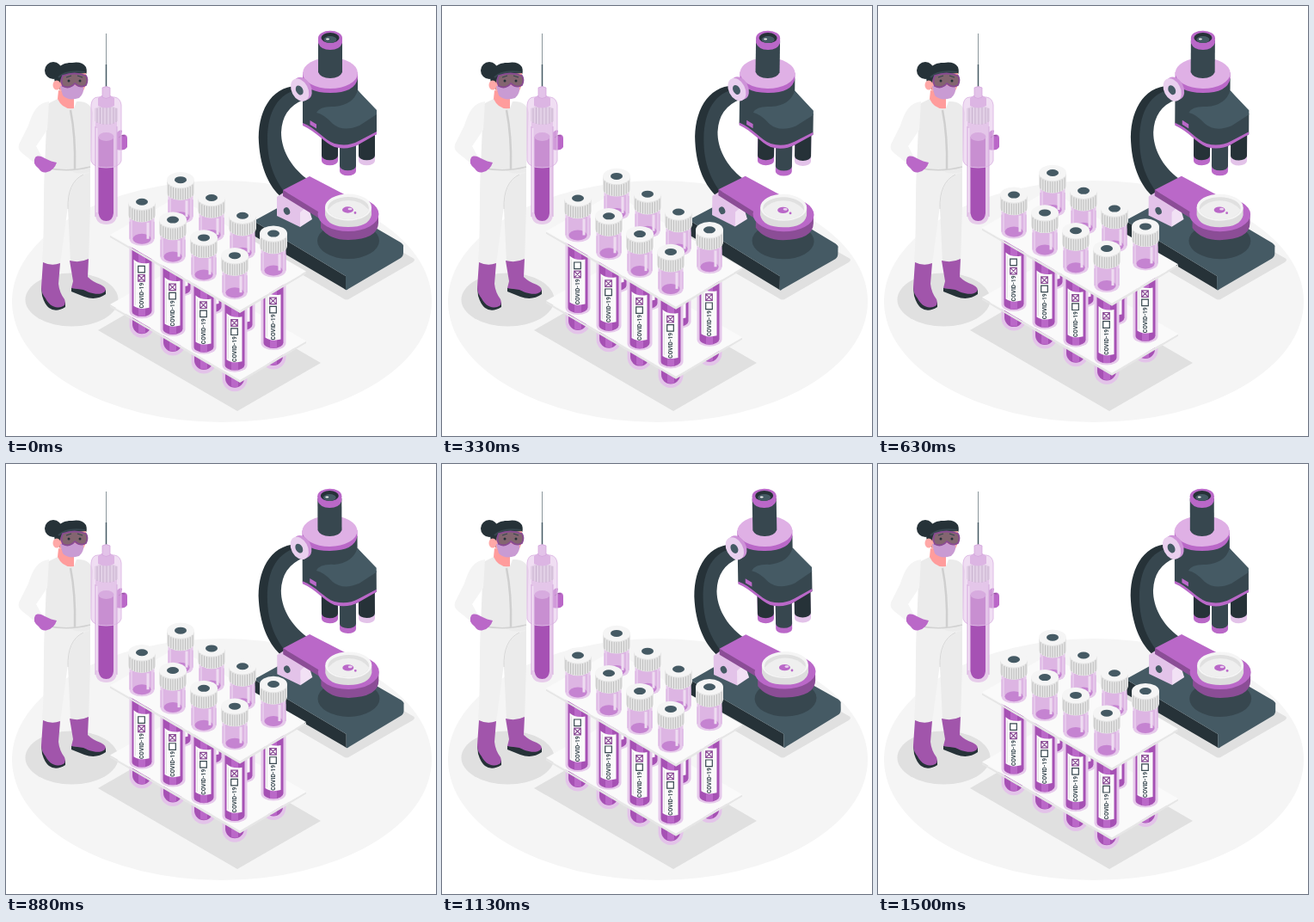
Animation of 500x500 px, one loop 1.54 s. Source, as an HTML page:

```html
<!DOCTYPE html>
<html lang="en">
<head>
<meta charset="utf-8">
<title>Laboratory test</title>
<style>
  html, body { margin: 0; width: 100%; height: 100%; overflow: hidden; background: #fff; }
  svg { display: block; width: 100vw; height: 100vh; }
  text { font: 700 6.7px Roboto, sans-serif; fill: #37474f; }
</style>
</head>
<body>
<svg viewBox="0 0 500 500">
  <ellipse cx="251" cy="343.500" rx="244" ry="140.500" fill="#f5f5f5"/>
  <g fill="#e0e0e0">
    <ellipse cx="76.500" cy="341.500" rx="54" ry="31"/>
    <path d="M275 272 392 340Q396 343 400 340L473 298Q477 295 473 293L355 226Z"/>
    <path d="M107 377 269 471 366 415 204 321Z"/>
  </g>

  <g id="person">
    <path d="M69 191 98 188 98 232 96 298Q85 302 75 298L72 235Z" fill="#ebebeb"/>
    <path d="M45 188 76 192Q84 197 98 193Q76 200 73 225L63 300Q52 304 42 299C45 260 43 220 45 188Z" fill="#f0f0f0"/>
    <path d="M72 236Q71 205 90 196" fill="none" stroke="#d8d8d8"/>
    <path d="M41 327 42 337Q45 347 50 351Q58 357 69 350V345ZM76 328 76 332 91 338Q105 343 116 335V330Z" fill="#263238"/>
    <path d="M43 298Q53 303 63 299L61 323Q62 333 68 341Q71 348 64 350C55 352 49 346 46 340Q41 334 41 327Z" fill="#a155ab"/>
    <path d="M74 296Q86 299 96 294L95 315Q101 321 110 324Q118 328 115 332C108 338 96 333 90 330L76 328 78 320Z" fill="#a155ab"/>
    <path d="M48 114 62 107Q67 121 79 119L82 111Q98 110 101 124L98 188Q73 195 45 188Z" fill="#ebebeb"/>
    <path d="M75 121Q81 151 80 190" fill="none" stroke="#cfcfcf" stroke-width="2.500"/>
    <path d="M46 188Q72 194 98 187" fill="none" stroke="#d2d2d2" stroke-width="1.500"/>
    <path d="M50 111C37 113 32 121 26 139L15 161Q13 167 20 172L35 184 42 176 35 163 48 144Z" fill="#f4f4f4"/>
    <path d="M34 176C40 171 48 181 59 182Q56 191 48 193Q42 195 38 189Q30 183 34 176Z" fill="#ba68c8"/>
    <path d="M61 98 60 108Q66 121 79 119V103Z" fill="#ff9c9c"/>
    <circle cx="55" cy="75" r="10" fill="#263238"/>
    <path d="M58 92C51 73 66 65 77 66Q88 64 93 71Q95 77 92 82L65 100Z" fill="#263238"/>
    <path d="M64 84Q77 79 93 78L92 94Q88 106 74 107L62 98Z" fill="#ffa8a7"/>
    <ellipse cx="59" cy="92" rx="4.500" ry="5.500" fill="#ffa8a7"/>
    <path d="M61 83Q70 74 92 77" fill="none" stroke="#37474f" stroke-width="2"/>
    <path d="M63 93Q72 92 78 91Q84 95 90 94Q91 102 85 107Q73 111 66 104Z" fill="#c99bd3"/>
    <path d="M66 81Q80 76 93 81Q96 86 93 92Q87 96 80 90Q74 97 66 93Q63 87 66 81Z" fill="#836570" stroke="#894a93" stroke-width="1.800"/>
    <g fill="#263238"><circle cx="73" cy="87" r="1.500"/><circle cx="86" cy="87" r="1.500"/></g>
    <path d="M70 83 76 81M83 81 89 83" stroke="#37474f" stroke-width="1.300"/>
    <path d="M129 147Q133 143 135 145L134 150Q141 148 141 154V164Q138 169 129 167Z" fill="#ba68c8"/>
    <path d="M131 153Q135 149 138 151" fill="none" stroke="#8d4f97"/>
  </g>

  <g id="syringe">
    <path d="M116.500 32V94" stroke="#8b979c"/>
    <path d="M116.500 68V95" stroke="#455a64" stroke-width="1.500"/>
    <path d="M104 130V243Q105 254 116.500 254T129 243V130Z" fill="#e6cbea"/>
    <path d="M107.500 152V241Q109 250 116.500 250T125 241V152Z" fill="#a651b4"/>
    <ellipse cx="116.500" cy="152" rx="9" ry="5" fill="#c98fd3"/>
    <path d="M99 115Q100 106 107 106H126Q133 107 134 115V180Q132 188 116.500 188T99 180Z" fill="#e3c3e9" fill-opacity=".55" stroke="#dfbce6"/>
    <path d="M103 119Q116 112 130 119V134Q117 141 103 134Z" fill="#e2d0e6"/>
    <path d="M106 119V136M109.500 118V137M113 118V138M117 118V138M121 118V138M125 118V137M128 119V135" stroke="#c9b2cf"/>
    <path d="M107 107Q116 99 126 107V116Q116 121 107 116Z" fill="#dcb5e3"/>
    <path d="M112 95Q116.500 92 121 95V106Q116 109 112 106Z" fill="#e3c3e9" stroke="#d1a0da" stroke-width=".7"/>
    <path d="M104 140V245M129 140V245" stroke="#d5a9dd"/>
    <path d="M105.500 142V240" stroke="#f3e1f5" stroke-width="1.500"/>
  </g>

  <g id="scope">
    <path d="M288 250 395 314V330L392 328 288 267Z" fill="#263238"/>
    <path d="M288 250 395 314V330Q396 331 398 329L459 293Q462 291 462 287V280Q463 278 459 275L354 214Z" fill="#455a64"/>
    <ellipse cx="398" cy="273" rx="36" ry="21" fill="#37474f"/>
    <path d="M338 93C307 94 292 125 294 159C296 190 307 211 320 222L325 214C300 185 295 120 341 102Z" fill="#263238"/>
    <path d="M341 97C317 101 304 122 304 155C304 186 315 205 325 218L350 201C330 186 320 166 320 147Q321 119 346 109Z" fill="#37474f"/>
    <path d="M315 222 324 216 353 234 342 257 315 244Z" fill="#e3c3e9"/>
    <path d="M342 257 356 248 351 232 342 240Z" fill="#f2e1f5"/>
    <ellipse cx="326.500" cy="238.500" rx="3.500" ry="4.500" transform="rotate(-25 326.5 238.500)" fill="#455a64"/>
    <path d="M322 214V221L366 248V258Q376 272 398 272Q433 271 433 252V242L366 238Z" fill="#8b4d96"/>
    <path d="M322 214 353 198 401 223 366 241Z" fill="#ba68c8"/>
    <ellipse cx="398" cy="242" rx="35.500" ry="20" fill="#ba68c8"/>
    <path d="M371 234V243Q374 257 398 257T425 243V234Z" fill="#ddd"/>
    <ellipse cx="398" cy="234" rx="27" ry="15.500" fill="#f5f5f5"/>
    <ellipse cx="398" cy="235" rx="24" ry="13" fill="#e0e0e0"/>
    <path d="M374 237Q383 226 398 226T422 237Q416 248 398 248T374 237Z" fill="#efefef"/>
    <g fill="#ba68c8">
      <ellipse cx="397.500" cy="237" rx="6.500" ry="3.700"/><circle cx="406" cy="240.500" r="1.400"/>
      <ellipse cx="400" cy="236" rx="2.500" ry="1.300" fill="#ead2ef"/>
    </g>

    <g id="lenses"></g>

    <path d="M345 113V137C360 143 370 158 382 163Q397 168 410 161L431 149V125L409 98V84H346Z" fill="#37474f"/>
    <path d="M361 124Q365 116 382 117Q404 115 409 98L431 121V126L411 139Q392 147 380 137Q370 126 361 124Z" fill="#455a64"/>
    <path d="M345 136C361 142 370 156 382 160Q397 164 410 157L431 146V149L410 161Q397 168 382 164C370 159 361 146 345 139Z" fill="#ba68c8"/>
    <path d="M353.500 133 361 137.500V142.500L353.500 138Z" fill="#ba68c8"/>
    <path d="M345 77V84Q348 101 377 101T409 84V77Z" fill="#ba68c8"/>
    <ellipse cx="377" cy="78" rx="32" ry="18" fill="#dfb0e5"/>
    <path d="M363 40V77Q366 84 377 84T391 77V40Z" fill="#37474f"/>
    <path d="M363 37V43Q366 51 377 51T391 43V37Z" fill="#ba68c8"/>
    <ellipse cx="377" cy="37" rx="14" ry="8.300" fill="#ba68c8"/>
    <ellipse cx="377" cy="37" rx="10.500" ry="6" fill="#263238"/>
    <ellipse cx="377" cy="39" rx="7.500" ry="4" fill="#455a64"/>
    <ellipse cx="374" cy="38.500" rx="2" ry="1" fill="#eee"/>
    <g transform="rotate(-28 343 97)">
      <ellipse cx="345" cy="97" rx="10" ry="14" fill="#ce93d8"/>
      <ellipse cx="341.500" cy="97" rx="9.500" ry="14" fill="#e9cfee"/>
      <ellipse cx="341" cy="97" rx="4" ry="5.800" fill="#455a64"/>
    </g>
  </g>

  <g id="rack"></g>
</svg>
<script>
const PERIOD = 1540, LIFT = 10, SWAY = 1;
const scope = document.getElementById('scope');
const rack = document.getElementById('rack');

const at = (x, y, body) => `<g transform="translate(${x} ${y})">${body}</g>`;
const oval = (y, rx, ry, fill) => `<ellipse cy="${y}" rx="${rx}" ry="${ry}" fill="${fill}"/>`;
const tubeWall = (top, bottom, r, fill) =>
  `<path d="M${-r} ${top}V${bottom}A${r} ${r * .55} 0 0 0 ${r} ${bottom}V${top}Z" fill="${fill}"/>`;

// Objectives below the microscope head
const lens = (x, y, height, shade, ring) => at(x, y,
  tubeWall(0, height, 9.5, ring) + tubeWall(0, height - 6, 9.5, shade));
document.getElementById('lenses').innerHTML =
  lens(376.5, 148, 32, '#263238', '#ba68c8') + lens(419.5, 148, 32, '#263238', '#e3c3e9')
  + lens(397.5, 156, 36, '#37474f', '#ba68c8');

// Test tubes, all measured from the centre of the cap
let ridges = '';
for (let x = -14; x <= 14; x += 2.8) {
  const curve = 9.2 * Math.sqrt(1 - (x / 16) ** 2);
  ridges += `M${x} ${curve + 1}V${14 + curve}`;
}
const cap = `<path d="M-16 0V14.500A16 9.200 0 0 0 16 14.500V0Z" fill="#e6e6e6"/>
  <path d="${ridges}" stroke="#bdbdbd"/>
  ${oval(0, 16, 9.2, '#f5f5f5')}${oval(0, 7, 4, '#455a64')}`;

const neck = tubeWall(15, 43, 14.5, '#e6c9eb') + tubeWall(15, 43, 11, '#ddb5e3')
  + oval(43, 10.5, 6, '#c583d1')
  + '<path d="M7 24V43" stroke="#eedcf1" stroke-width="3"/><path d="M-14 23V43M14 23V43" stroke="#d3a4dc" stroke-width=".8"/>';

const box = (y, checked) => `<path d="M-4.300 ${y - 3.8}h7.600v7.600h-7.600z${
  checked ? 'l7.600 7.600m0-7.600l-7.600 7.600' : ''}" fill="#fff" stroke="${checked ? '#8b4d96' : '#37474f'}" stroke-width="1.200"/>`;
const body = lowerChecked => tubeWall(50, 127.5, 14.5, '#e6c9eb') + tubeWall(50, 127, 11.5, '#a651b4')
  + '<path d="M-4 55V133H4V55Z" fill="#ba68c8"/>'
  + '<path d="M-9.500 67Q-3 73 8.500 71V123Q-3 126 -9.500 121Z" fill="#fafafa"/>'
  + '<path d="M-7.500 71V120" stroke="#ddd" stroke-width=".8"/>'
  + box(78.3, !lowerChecked) + box(88.5, lowerChecked)
  + '<text transform="translate(2 123.800) rotate(-90)">COVID-19</text>';

const bulb = `<path d="M-14.500 120V143.500A14.500 14.500 0 0 0 14.500 143.500V120Z" fill="#e3c3e9"/>
  <path d="M-11 120V142.500A11 11 0 0 0 11 142.500V120Z" fill="#a651b4"/>
  <path d="M-4 120V152Q2 154 4 152V120Z" fill="#ba68c8"/>`;

const plate = y => at(0, y, `<path d="M121 267V269L272 357 349 311V309L272 353Z" fill="#e6e6e6"/>
  <path d="M121 266 272 354 349 308.500 199 222Z" fill="#fafafa"/>`);

const row = (x, y) => [0, 1, 2, 3].map(i => [x + 36 * i, y + 20.8 * i, i]);
const back = row(203, 202.2), front = row(158, 227.8);
const tubes = [...back, ...front];
const each = (list, draw) => list.map(([x, y, i]) => at(x, y, draw(i))).join('');

rack.innerHTML = each(tubes, () => bulb) + plate(81)
  + each(back, () => body(false)) + each(front, i => body(i === 0))
  + plate(0) + each(tubes, () => neck + cap);

function draw(now) {
  const p = now % PERIOD / PERIOD;
  const lift = LIFT * (1 - Math.abs(1 - 2 * p));
  const sway = SWAY * (p < .25 ? 4 * p : p < .75 ? 2 - 4 * p : 4 * p - 4);
  rack.setAttribute('transform', `translate(0 ${-lift})`);
  scope.setAttribute('transform', `rotate(${sway} 375 179)`);
}

const start = performance.now();
function tick() {
  draw(performance.now() - start);
  requestAnimationFrame(tick);
}
tick();
</script>
</body>
</html>
```
